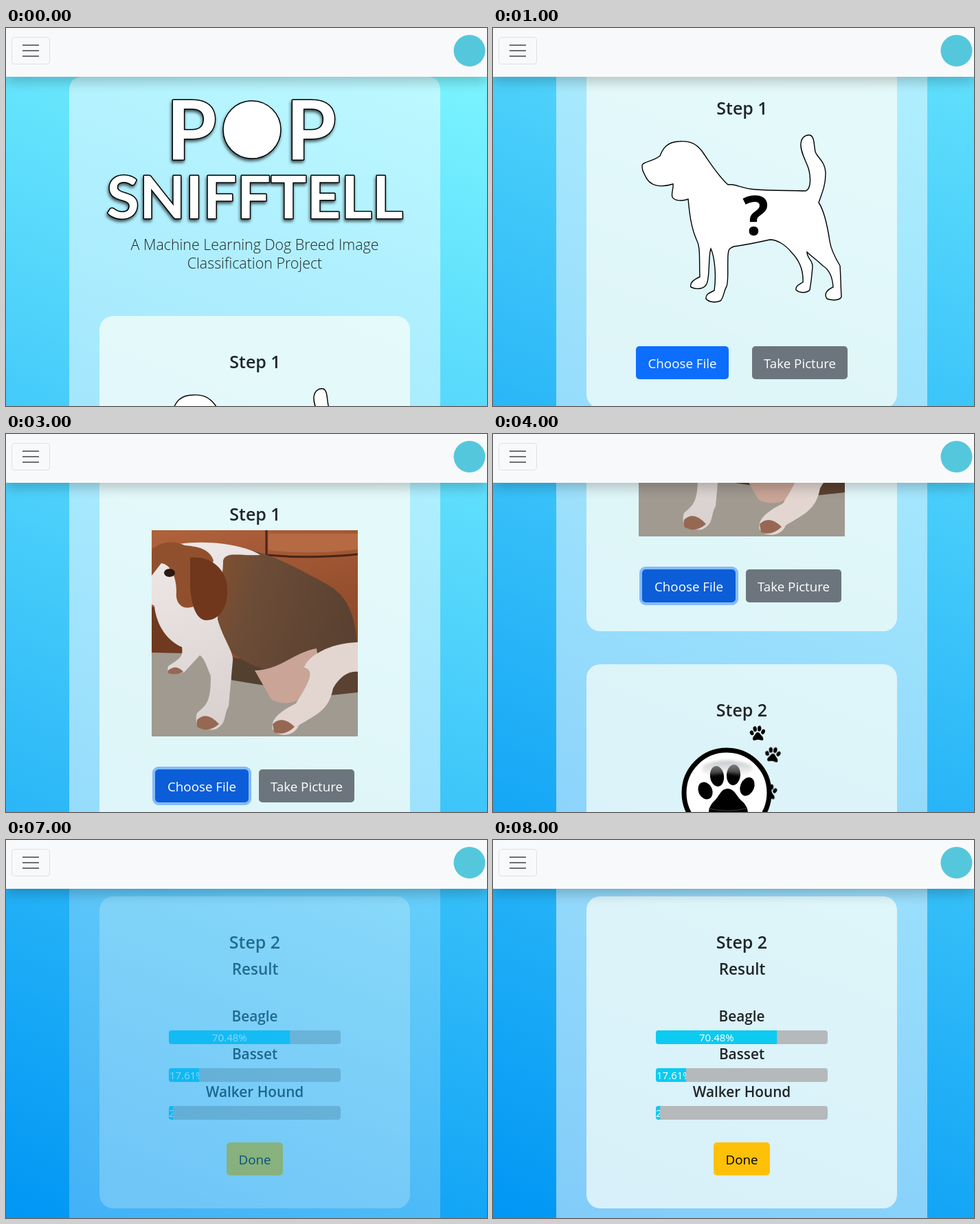
An HTML page for the animation above (9000 ms loop, 700 by 550 pixels).

```html
<!DOCTYPE html>
<html lang="en">
<head>
<meta charset="utf-8">
<title>Dog breed demo</title>
<style>
html, body { margin: 0; width: 100%; height: 100%; overflow: hidden; }
body { position: relative; font-family: "Open Sans", "Noto Sans", sans-serif; }
svg { position: absolute; left: 0; top: 0; display: block; }
text { font-family: "Open Sans", "Noto Sans", sans-serif; }
#stage { position: absolute; left: 0; top: 0; width: 700px; height: 550px; overflow: hidden; }
#page { position: absolute; width: 700px; height: 1498px; background: linear-gradient(22deg, #0096f4, #80f8ff); }
#nav { position: absolute; width: 700px; height: 71px; background: #f8f9fa; box-shadow: 0 8px 16px rgba(0,0,0,.2); }

#page, #box, #pick, #preview, #dialog, #ask, #result, #go { animation: 9s step-end infinite; }
#page { animation-name: scroll; }
#box { animation-name: fade; }
#pick { animation-name: pick; }
#preview { animation-name: preview; }
#dialog { animation-name: dialog; }
#ask { animation-name: ask; }
#result { animation-name: result; }
#go { fill: #198754; animation-name: hover; }
@keyframes scroll {
  0% { transform: translateY(0); }
  11.1111% { transform: translateY(-369px); }
  44.4444% { transform: translateY(-660px); }
  55.5555%, 100% { transform: translateY(-948px); }
}
@keyframes fade { 0% { opacity: 1; } 77.7777% { opacity: .5; } 88.8888%, 100% { opacity: 1; } }
@keyframes pick { 0% { visibility: visible; } 33.3333%, 100% { visibility: hidden; } }
@keyframes preview { 0% { visibility: hidden; } 33.3333%, 100% { visibility: visible; } }
@keyframes dialog { 0% { visibility: hidden; } 22.2222% { visibility: visible; } 33.3333%, 100% { visibility: hidden; } }
@keyframes ask { 0% { visibility: visible; } 77.7777%, 100% { visibility: hidden; } }
@keyframes result { 0% { visibility: hidden; } 77.7777%, 100% { visibility: visible; } }
@keyframes hover { 0% { fill: #198754; } 66.6666%, 100% { fill: #157347; } }

.card { fill: rgba(253,255,248,.7); }
.mid { text-anchor: middle; }
.head { font-size: 25px; font-weight: 600; fill: #212529; text-anchor: middle; }
.sub { font-size: 22.5px; }
.breed { font-size: 20.8px; }
.lead { font-size: 21.4px; font-weight: 300; fill: #212529; text-anchor: middle; }
.btn { font-size: 18.8px; font-weight: 500; fill: #fff; text-anchor: middle; }
.pct { font-size: 15px; fill: #fff; }
.title { font-family: Lato, "Open Sans", sans-serif; font-weight: 700; fill: #fff; stroke: #000; stroke-width: 3px;
  stroke-linejoin: round; paint-order: stroke; text-anchor: middle; }
.lift { filter: drop-shadow(-1px 3px 2px rgba(0,0,0,.65)); }
#dialog text { font-size: 11.4px; fill: #fff; }
#dialog text.dim { fill: #9a9a9a; }
.line { fill: none; stroke: #ccc; stroke-width: 1.3px; }
</style>
</head>
<body>
<div id="stage">
<div id="page">
<svg width="700" height="1498" viewBox="0 0 700 1498">
  <defs>
    <g id="paw">
      <ellipse cx="-31" cy="-8" rx="10" ry="13" transform="rotate(-25 -31 -8)"/>
      <ellipse cx="-14" cy="-29" rx="10" ry="15" transform="rotate(-8 -14 -29)"/>
      <ellipse cx="10" cy="-31" rx="10" ry="15" transform="rotate(5 10 -31)"/>
      <ellipse cx="30" cy="-14" rx="10" ry="14" transform="rotate(22 30 -14)"/>
      <path d="M1-11C12-11 14 0 22 7C32 15 34 29 26 32C16 33 11 28 1 29C-8 30-12 34-21 32C-29 29-27 15-18 7C-10-1-9-10 1-11Z"/>
    </g>
    <linearGradient id="coat" x2="1" y2=".3">
      <stop stop-color="#86512f"/><stop offset=".35" stop-color="#6b4c37"/><stop offset="1" stop-color="#5a4131"/>
    </linearGradient>
    <linearGradient id="couch" x2=".3" y2="1">
      <stop stop-color="#b0623c"/><stop offset="1" stop-color="#7f4023"/>
    </linearGradient>
    <linearGradient id="chest" x2=".2" y2="1">
      <stop stop-color="#efe9e8"/><stop offset="1" stop-color="#d9d2d0"/>
    </linearGradient>
    <clipPath id="square"><path d="M0 0H300V300H0Z"/></clipPath>
    <g id="photo" clip-path="url(#square)">
      <path fill="url(#couch)" d="M0 0H300V300H0Z"/>
      <path fill="#6f3a20" d="M0 112H60V180H0Z"/>
      <path fill="none" stroke="#4b2416" stroke-width="3" d="M167 0V36Q230 42 300 35"/>
      <path fill="#b56a44" d="M170 5H300V28Q230 36 170 29Z"/>
      <path fill="#a09a91" d="M0 178L90 180L190 240L300 232V300H0Z"/>
      <path fill="#54402f" d="M112 184L196 200L178 228L116 218Z"/>
      <path fill="url(#coat)" d="M92 26C150 18 206 52 254 78C290 98 304 130 300 236L262 240L176 206C142 196 116 184 102 160C92 120 84 60 92 26Z"/>
      <path fill="#c9a497" d="M150 204C186 204 206 178 240 172L246 214C224 252 194 258 174 246Z"/>
      <path fill="#e3d6d0" d="M300 163C258 164 226 184 222 200C240 204 226 226 210 252C190 262 172 274 176 290C186 302 208 300 214 284C240 268 258 262 264 230C274 212 288 204 300 206Z"/>
      <path fill="url(#chest)" d="M40 20C80 14 132 20 158 36C130 38 108 30 104 44C104 70 96 100 96 130C104 158 120 178 118 190L112 256C104 270 110 282 92 290C74 292 60 284 66 266C80 254 86 250 86 212C78 192 76 186 70 182L48 206C34 212 20 210 24 198C42 186 46 184 44 170C20 160 6 134 4 110L0 108V30Z"/>
      <path fill="#91502d" d="M0 28C14 16 32 14 48 22C70 24 84 28 90 44L64 110C46 118 34 108 36 90C36 68 28 50 14 48L0 66Z"/>
      <path fill="#70371c" d="M56 40C86 36 112 58 110 90C110 116 96 132 78 131C62 128 58 104 56 84Z"/>
      <ellipse cx="26" cy="62" rx="8" ry="6" fill="#2c1911"/>
      <path fill="#966854" d="M24 204Q36 194 46 206Q36 212 24 208ZM66 276Q80 262 98 282Q82 296 66 286ZM176 282Q190 268 208 286Q194 300 178 294Z"/>
    </g>
    <linearGradient id="glass" x2="0" y2="1">
      <stop stop-color="#fff"/><stop offset=".7" stop-color="#fff"/><stop offset=".75" stop-color="#e2e2e2"/><stop offset="1" stop-color="#fafafa"/>
    </linearGradient>
    <linearGradient id="shine" x2="0" y2="1">
      <stop stop-color="#aeb2b5" stop-opacity=".8"/><stop offset="1" stop-color="#ddd" stop-opacity=".25"/>
    </linearGradient>
    <filter id="soft"><feGaussianBlur stdDeviation="2"/></filter>
  </defs>
  <g id="box">
    <path fill="#fff" fill-opacity=".5" d="M92 1510V91Q92 71 112 71H612Q632 71 632 91V1510Z"/>
    <g class="lift">
      <text class="title" font-size="118" x="270" y="191">P</text>
      <circle cx="358" cy="148" r="42" fill="#fff" stroke="#000" stroke-width="1.5"/>
      <text class="title" font-size="118" x="444" y="191">P</text>
      <text class="title" font-size="87" x="362" y="277">SNIFFTELL</text>
    </g>
    <text class="lead" x="362" y="323">A Machine Learning Dog Breed Image</text>
    <text class="lead" x="362" y="350">Classification Project</text>

    <g transform="translate(0 369)">
      <g id="pick">
        <rect class="card" x="136" y="50" width="452" height="503" rx="20"/>
        <path fill="#fff" stroke="#000" stroke-width="1.4" d="M217 200C218 194 232 195 243 186C247 176 253 165 272 165C288 164 296 169 304 179C316 196 328 216 342 228C352 226 362 234 382 235C408 237 430 236 455 237C464 234 462 214 459 204C455 192 447 180 448 168C449 158 456 155 462 156C468 159 467 171 469 180C472 189 484 194 484 212C484 230 478 242 474 254C482 266 487 290 490 310C492 324 499 336 505 346C506 360 506 374 507 391C506 396 494 397 486 394C481 387 486 381 495 377C494 362 490 352 480 346C472 338 463 332 457 326C457 336 466 338 465 348C464 360 463 370 461 381C457 386 446 386 441 381C440 375 446 373 451 370C452 352 446 338 434 326C426 316 414 308 403 308C385 312 365 316 350 318C343 321 343 322 342 330C341 350 343 368 340 376C336 382 336 392 331 397C324 400 314 399 310 394C309 387 316 385 322 382C325 362 323 334 317 321C313 332 316 362 311 372C308 380 296 381 288 377C286 371 292 366 301 362C300 340 302 320 297 310C288 290 286 270 284 249C276 252 264 252 261 246C259 240 263 234 262 227C246 232 228 232 221 214C218 208 217 206 217 200Z"/>
        <text class="mid" x="382" y="301" font-size="79" font-weight="700">?</text>
        <rect x="208" y="463" width="135" height="48" rx="5" fill="#0d6efd"/>
        <text class="btn" x="275.5" y="495">Choose File</text>
        <rect x="377" y="463" width="139" height="48" rx="5" fill="#6c757d"/>
        <text class="btn" x="446.5" y="495">Take Picture</text>
      </g>
      <g id="preview">
        <rect class="card" x="136" y="50" width="452" height="528" rx="20"/>
        <use href="#photo" x="212" y="140"/>
        <rect x="215" y="486" width="140" height="52" rx="7" fill="none" stroke="#86bbfa" stroke-width="4"/>
        <rect x="217" y="488" width="136" height="48" rx="5" fill="#0b5ed7"/>
        <text class="btn" x="285" y="520">Choose File</text>
        <rect x="368" y="488" width="139" height="48" rx="5" fill="#6c757d"/>
        <text class="btn" x="437.5" y="520">Take Picture</text>
      </g>
      <text class="head" x="362.5" y="126">Step 1</text>
    </g>

    <g transform="translate(0 948)">
      <g id="ask">
        <rect class="card" x="136" y="47" width="452" height="504" rx="20"/>
        <text class="head" x="362" y="123">Step 2</text>
        <g id="trail"></g>
        <path d="M309 292L273 360" stroke="#000" stroke-width="14" stroke-linecap="round"/>
        <circle cx="340" cy="234" r="62" fill="url(#glass)" stroke="#000" stroke-width="7"/>
        <use href="#paw" x="340" y="239"/>
        <path d="M306 194Q340 180 376 194Q382 206 360 208L340 205L318 208Q300 206 306 194Z" fill="url(#shine)" filter="url(#soft)"/>
        <path d="M314 257Q341 263 369 257" fill="none" stroke="#444" stroke-width="1"/>
        <rect id="go" x="297" y="459" width="130" height="48" rx="5"/>
        <text class="btn" x="362" y="491">Investigate</text>
      </g>
      <g id="result">
        <rect class="card" x="136" y="82" width="452" height="454" rx="20"/>
        <text class="head" x="362" y="158">Step 2</text>
        <text class="head sub" x="362.5" y="196">Result</text>
        <g id="bars"></g>
        <rect x="321" y="440" width="82" height="48" rx="5" fill="#ffc107"/>
        <text class="btn" x="362" y="472" style="fill:#000">Done</text>
      </g>
    </g>
  </g>
</svg>
</div>

<div id="nav">
<svg width="700" height="71">
  <rect x="8.5" y="13.5" width="55" height="39" rx="4" fill="none" stroke="#dfe0e1"/>
  <path d="M24 25H48M24 33H48M24 41H48" stroke="#6f7071" stroke-width="2"/>
  <circle cx="674.5" cy="33" r="23" fill="#55c7dc"/>
</svg>
</div>

<svg id="dialog" width="700" height="550">
  <rect x="12" y="62" width="648" height="500" fill="#191919" style="filter:drop-shadow(0 2px 6px rgba(0,0,0,.55))"/>
  <path fill="#2b2b2b" d="M12 62H660V92H12Z"/>
  <circle cx="28" cy="76" r="8" fill="#dc4a3d"/>
  <text class="dim" x="41" y="81">Open</text>
  <path class="line" d="M640 71L650 81M650 71L640 81"/>
  <g fill="none" stroke="#fff" stroke-width="2">
    <path d="M37 112H26M31 107L26 112L31 117M105 118V107M100 112L105 107L110 112"/>
    <path stroke="#888" d="M55 112H66M61 107L66 112L61 117"/>
    <path stroke-width="1.5" d="M81 110L84 113L87 110"/>
  </g>
  <path fill="none" stroke="#555" d="M118.500 97.500H433.500V126.500H118.500ZM446.500 97.500H647.500V126.500H446.500Z M403.500 98V126"/>
  <path fill="#f6d36d" d="M123 104H134V119H123Z"/>
  <path class="line" stroke-opacity=".6" d="M146 108L143 111L146 114M150 108L147 111L150 114M211 108L214 112L211 116M381 111L385 115L389 111M421 109A4.500 4.500 0 1 0 422 114M422 107V110H418M461 117L465 113"/>
  <circle class="line" stroke-opacity=".6" cx="468" cy="110" r="4"/>
  <text x="158" y="116">Desktop</text>
  <text x="224" y="116">Velmor Test Images</text>
  <text class="dim" x="487" y="116">Search Velmor Test Images</text>
  <text x="30" y="153">Organize</text>
  <path fill="#ccc" d="M82 147H90L86 151ZM563 147H572L567.500 152Z"/>
  <text x="121" y="153">New folder</text>
  <path fill="#e9f1f7" d="M539 143H553V155H539ZM593 143H608V155H593Z"/>
  <path fill="#4a86b8" d="M541 151L545 147L551 153H541ZM602 145H607V154H602Z"/>
  <circle cx="637" cy="149" r="7.500" fill="#1677d2"/>
  <text class="mid" x="637" y="153" font-weight="700">?</text>
  <path fill="#202020" d="M170 164H644V487H170Z"/>
  <path stroke="#3a3a3a" d="M12 164.500H660M169.500 165V487"/>
  <path fill="#2b2b2b" d="M152 165H168V487H152ZM644 165H660V487H644Z"/>
  <path fill="#5a5a5a" d="M152 220H168V368H152ZM644 182H660V337H644Z"/>
  <path class="line" d="M157 176L160 173L163 176M157 477L160 480L163 477M649 176L652 173L655 176M649 477L652 480L655 477"/>
  <path fill="#353535" d="M12 469H152V487H12ZM187 172H290V286H187Z"/>
  <clipPath id="pane"><path d="M12 165H644V487H12Z"/></clipPath>
  <clipPath id="tree"><path d="M12 165H152V487H12Z"/></clipPath>
  <g clip-path="url(#tree)"><g id="side"></g></g>
  <g clip-path="url(#pane)"><g id="files"></g></g>
  <path fill="#2b2b2b" d="M12 487H660V550H12Z"/>
  <text x="142" y="512">File name:</text>
  <path fill="#333" stroke="#777" d="M201.500 496.500H442.500V519.500H201.500ZM455.500 496.500H642.500V519.500H455.500Z"/>
  <path class="line" d="M430 506L434 510L438 506M628 506L632 510L636 506"/>
  <text x="205" y="513">beagle.jpg</text>
  <text x="459" y="512">All Files (*.*)</text>
  <path fill="#333" stroke="#ddd" stroke-width="2" d="M456 526H542V551H456Z"/>
  <path fill="#333" stroke="#aaa" d="M555.500 525.500H642.500V551H555.500Z"/>
  <text class="mid" x="498" y="542">Open</text>
  <text class="mid" x="599" y="542">Cancel</text>
</svg>
</div>

<script>
const fill = (id, items, draw) =>
  document.getElementById(id).innerHTML = items.map(draw).join('');
const blob = (x, y, rx, ry, color, turn = 0) =>
  `<ellipse cx="${x}" cy="${y}" rx="${rx}" ry="${ry}" fill="${color}" transform="rotate(${turn} ${x} ${y})"/>`;

fill('trail', [
  [385, 149, 0], [407, 180, 8], [402, 234, 5], [402, 290, 8], [364, 314, 0],
  [379, 348, 28], [337, 356, 0], [300, 394, 8], [344, 394, 28]
], ([x, y, turn]) =>
  `<use href="#paw" filter="url(#soft)" transform="translate(${x} ${y}) rotate(${turn}) scale(.27)"/>`);

fill('bars', [['Beagle', 70.48, 300], ['Basset', 17.61, 238], ['Walker Hound', 2.49, 237]],
  ([name, value, x], i) => {
    const y = 277 + i * 55, w = value * 2.5;
    return `<text class="head breed" x="362" y="${y - 13}">${name}</text>
      <clipPath id="bar${i}"><rect x="237" y="${y}" width="250" height="20" rx="4"/></clipPath>
      <clipPath id="done${i}"><rect x="237" y="${y}" width="${w}" height="20"/></clipPath>
      <g clip-path="url(#bar${i})"><rect x="237" y="${y}" width="250" height="20" fill="#b5b9bb"/>
      <g clip-path="url(#done${i})"><rect x="237" y="${y}" width="250" height="20" fill="#0dcaf0"/>
      <text class="pct" x="${x}" y="${y + 16}">${value}%</text></g></g>`;
  });

// Sidebar: label, middle y, icon kind, indent, pinned
const icons = {
  folder: '<path fill="#f6d36d" d="M0-6H5L7-4H12V7H0Z"/><path fill="#dca93f" d="M9-4H12V7H9Z"/>',
  page: '<path fill="#dcebf7" d="M0-7H12V7H0Z"/><path stroke="#4c87b9" d="M2-3H10M2 0H10M2 3H10"/>',
  image: '<path fill="#dcebf7" d="M-1-6H14V6H-1Z"/><path fill="#3e83b9" d="M1 4L5-1L8 2L10 0L13 4Z"/>',
  disk: '<path fill="#bbb" d="M1-4H12L14 1V5H-1V1Z"/><path fill="#555" d="M0 1H13V4H0Z"/>',
  cloud: '<circle cx="7" r="7" fill="#1685d9"/>',
  screen: '<path fill="#31a8e4" d="M-1-6H14V4H-1Z"/><path fill="#9bb" d="M5 4H8V6H11V7H2V6H5Z"/>',
  cube: '<path fill="#49bddd" d="M6-7L13-4V4L6 7L-1 4V-4Z"/><path fill="#9be1f0" d="M6-7L13-4L6-1L-1-4Z"/>'
};
fill('side', [
  ['Documents', 177, 'page', 0, 1], ['Pictures', 201, 'image', 0, 1], ['repos', 225, 'folder', 0, 1],
  ['htdocs', 249, 'folder', 0, 1], ['Local Disk (D:', 273, 'disk', 0, 1], ['Aux', 297, 'folder', 0],
  ['Tolverin', 321, 'folder', 0], ['MiniLab3', 345, 'folder', 0], ['Players', 369, 'folder', 0],
  ['NimVault - Person', 401, 'cloud', -8], ['This PC', 433, 'screen', -8],
  ['3D Objects', 457, 'cube', 0], ['Desktop', 481, 'screen', 0]
], ([label, y, icon, dx, pin]) =>
  `<g transform="translate(${46 + dx} ${y})">${icons[icon]}<text x="19" y="4">${label}</text>` +
  (pin ? '<path stroke="#aaa" stroke-width="2" fill="#aaa" d="M92 5L95 2M94-1L98 3M96-1L99-4L101-2L98 1Z"/>' : '') + '</g>');

// Small animals: a bird, a lying dog, or a standing dog around its own centre
function pet(kind, coat, chest) {
  if (kind == 'bird') return blob(42, 34, 15, 17, coat, 25) + blob(62, 34, 20, 10, '#2d2b2f', -30) +
    blob(34, 16, 6, 11, chest) + blob(33, 7, 5, 4, '#d22d20') +
    '<path stroke="#c99345" stroke-width="2" d="M40 48V62M47 48V62"/>';
  if (kind == 'lie') return blob(56, 56, 34, 20, coat) + blob(42, 54, 18, 24, chest) +
    blob(50, 32, 17, 18, coat) + blob(50, 38, 8, 8, chest) + blob(50, 35, 3, 2, '#222') +
    blob(44, 28, 2, 2, '#222') + blob(57, 28, 2, 2, '#222') + blob(26, 78, 17, 6, coat);
  const legs = [-10, -3, 5, 12].map(x => blob(x, 28, 2.6, 12, chest)).join('');
  return legs + blob(1, 14, 16, 11, coat) + blob(-8, 13, 6, 10, chest) + blob(-8, -4, 9, 9, coat) +
    blob(-15, -11, 3, 7, coat, -25) + blob(-1, -11, 3, 7, coat, 25) + blob(-9, 0, 4, 4, chest) +
    blob(-9, -1, 2, 1.5, '#181818') + blob(18, 8, 2.5, 10, coat, 25);
}
const fields = [
  ['chicken.jpg', 90, 67, '#548a35', '#3f762d', 'bird', '#a6501f', '#d28a32'],
  ['chihi.jpg', 90, 60, '#a2cd72', '#79ad4c', [52, 25, .85], '#343136', '#af9c89'],
  ['dalmation.jpg', 90, 53, '#35582d', '#568b35', [44, 20, .75], '#8b8c88', '#e5e5dd'],
  ['dholetest.jpg', 62, 90, '#8c9b79', '#a19b8c', [31, 40, 1], '#a75d2a', '#bd7a44'],
  ['dog.jpg', 90, 88, '#578f43', '#6eaa50', 'lie', '#c99c62', '#e4c99c'],
  ['ent.jpg', 90, 71, '#a9bfd0', '#839650', [49, 27, .95], '#262326', '#ad6a3b'],
  ['rover1.png', 67, 90, '#c3c1be', '#8e6549', [36, 37, 1.05], '#302b2d', '#c4bdb8'],
  ['', 67, 90, '#69a83d', '#4f912d', [30, 42, .9], '#b87a45', '#d9b38c'],
  ['', 67, 90, '#a6a29b', '#696860', [36, 32, 1.1], '#24262a', '#b69579'],
  ['', 90, 60, '#647943', '#789450', [46, 21, .9], '#553c29', '#bd8246'],
  ['', 90, 60, '#d3d1cf', '#bfb5aa', 'lie', '#a95c27', '#c47c3e']
];
fill('files', fields, ([name, w, h, back, ground, pose, coat, chest], i) => {
  const n = i + 1, cx = 237 + n % 4 * 114, row = Math.floor(n / 4), base = 265 + row * 117;
  const animal = Array.isArray(pose)
    ? `<g transform="translate(${pose[0]} ${pose[1]}) scale(${pose[2]})">${pet('stand', coat, chest)}</g>`
    : pet(pose, coat, chest);
  return `<clipPath id="thumb${i}"><path d="M0 0H${w}V${h}H0Z"/></clipPath>
    <g transform="translate(${cx - w / 2} ${base - h})" clip-path="url(#thumb${i})">
    <path fill="${back}" d="M0 0H${w}V${h}H0Z"/>
    <path fill="${ground}" d="M0 ${h * .55}Q${w / 2} ${h * .45} ${w} ${h * .6}V${h}H0Z"/>${animal}</g>
    <text class="mid" x="${cx + 2}" y="${base + 16}">${name}</text>`;
});
document.getElementById('files').insertAdjacentHTML('beforeend',
  '<use href="#photo" transform="translate(192 175) scale(.3)"/><text class="mid" x="238" y="281">beagle.jpg</text>');
</script>
</body>
</html>
```
